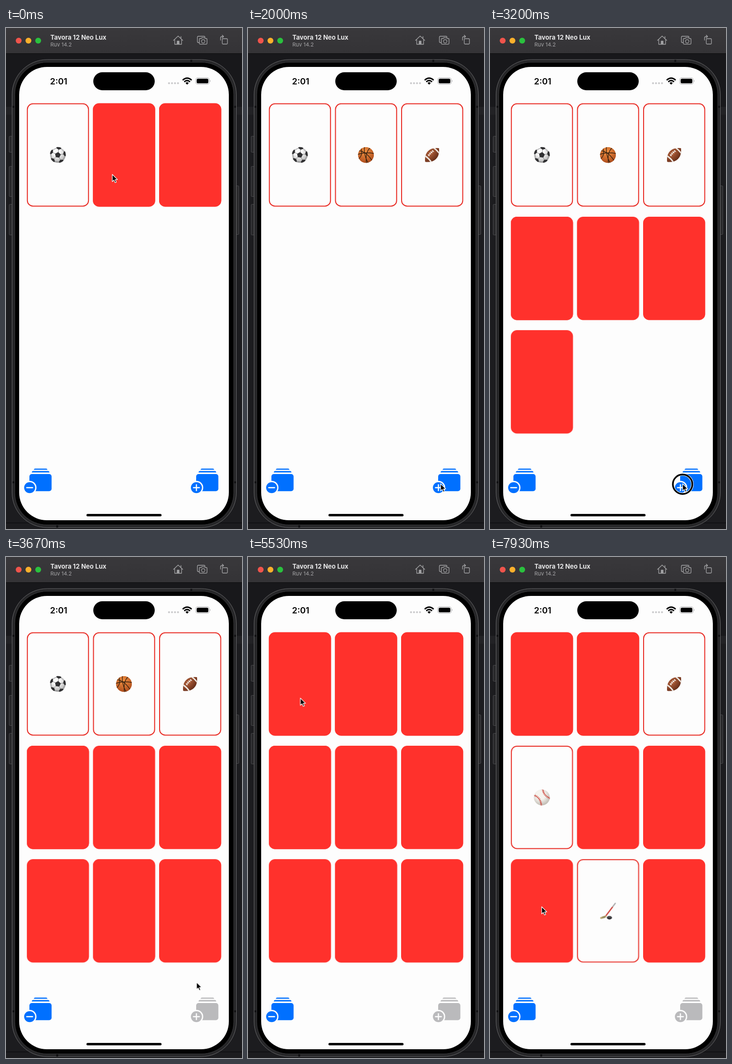
Recreate the animation shown at these times as an HTML page. Size 484 by 1030 pixels, loop 8000 ms.

```html
<!DOCTYPE html>
<html lang="en">
<head>
<meta charset="utf-8">
<title>Card matching demo</title>
<style>
html, body { margin: 0; width: 100%; height: 100%; overflow: hidden; background: #1c1c1f; }
svg { display: block; }
text { font-family: Inter, Roboto, sans-serif; }

.card, .cover, .ring { animation: 8s step-end infinite; }
.cover { fill: #ff312c; }
.face { fill: #fdfdfd; stroke: #e93029; stroke-width: 2; }
.late, .ring { opacity: 0; }

/* cards dealt by the plus button */
@keyframes deal4 { 27.5%, to { opacity: 1 } }
@keyframes deal5 { 32.25%, to { opacity: 1 } }
@keyframes deal6 { 35.4%, to { opacity: 1 } }
@keyframes deal7 { 38.1%, to { opacity: 1 } }
@keyframes deal8 { 40.9%, to { opacity: 1 } }
@keyframes deal9 { 43.3%, to { opacity: 1 } }

/* covers: 0 shows the face */
@keyframes flip1 { 0% { opacity: 0 } 66.9%, to { opacity: 1 } }
@keyframes flip2 { 5.6% { opacity: 0 } 60%, to { opacity: 1 } }
@keyframes flip3 { 14.1% { opacity: 0 } 53.4% { opacity: 1 } 85.1%, to { opacity: 0 } }
@keyframes flip4 { 74.1%, to { opacity: 0 } }
@keyframes flip8 { 93.75%, to { opacity: 0 } }

.ring { animation-name: press; }
@keyframes press {
  4.4%, 12.9%, 26.25%, 31%, 34.25%, 37%, 39.8%, 42.2%,
  52.25%, 58.75%, 65.6%, 73%, 83.6%, 92.5% { opacity: 1 }
  5.6%, 14.1%, 27.5%, 32.25%, 35.4%, 38.1%, 40.9%, 43.3%,
  53.4%, 60%, 66.9%, 74.1%, 85.1%, 93.75%, to { opacity: 0 }
}

.pointer { animation: travel 8s ease-in-out infinite; }
@keyframes travel {
  0% { transform: translate(218px, 301px) }
  3.75%, 7.5% { transform: translate(226px, 300px) }
  11.88%, 15% { transform: translate(357px, 297px) }
  23.75%, 44.5% { transform: translate(395px, 937px) }
  51.25%, 55% { transform: translate(346px, 211px) }
  58.13%, 60.75% { transform: translate(240px, 235px) }
  64.6%, 68% { transform: translate(108px, 250px) }
  72.25%, 76% { transform: translate(104px, 520px) }
  82%, 86.25% { transform: translate(365px, 267px) }
  91.5%, 94.5% { transform: translate(243px, 716px) }
  98.1%, to { transform: translate(106px, 719px) }
}

.stack { color: #0070ff; fill: currentColor; }
.plus { animation: dim 8s linear infinite, disable 8s linear infinite; }
@keyframes dim {
  0%, 26.3%, 29.4%, 31%, 34.2%, 37.2%, 39.9%, 40.05%, 44%, to { opacity: 1 }
  27.5%, 32.25%, 35.4%, 38.1%, 40.9%, 43.3% { opacity: .7 }
  42.2% { opacity: .92 }
}
@keyframes disable {
  0%, 43.3% { color: #0070ff }
  44.3%, to { color: #bababc }
}
</style>
</head>
<body>
<svg width="484" height="1030" viewBox="0 0 484 1030">
  <defs>
    <radialGradient id="white" cx=".42" cy=".3" r=".75">
      <stop offset=".3" stop-color="#fafafa"/><stop offset="1" stop-color="#a5a5a5"/>
    </radialGradient>
    <radialGradient id="cream" cx=".42" cy=".35" r=".7">
      <stop offset=".4" stop-color="#f6f4ef"/><stop offset="1" stop-color="#b9b5ac"/>
    </radialGradient>
    <radialGradient id="orange" cx=".45" cy=".3" r=".75">
      <stop offset=".1" stop-color="#ec8b3e"/><stop offset="1" stop-color="#a9481a"/>
    </radialGradient>
    <radialGradient id="brown" cx=".5" cy=".3" r=".75">
      <stop offset=".1" stop-color="#a95a36"/><stop offset="1" stop-color="#5c2714"/>
    </radialGradient>
    <clipPath id="round"><circle r="16.4"/></clipPath>
    <clipPath id="oval"><path d="M-20 0Q-11-11.5 0-11.5T20 0Q11 11.5 0 11.5T-20 0Z"/></clipPath>

    <g id="patch">
      <path d="M0-11 5-13.5 4.5-18H-4.5L-5-13.5Z" fill="#303032"/>
      <path d="M0-6V-11M5-13.5 11.3-8.9" stroke="#77777a" stroke-width=".8" fill="none"/>
    </g>
    <g id="soccer" clip-path="url(#round)">
      <circle r="16.4" fill="url(#white)"/>
      <g transform="rotate(8)">
        <path d="M0-6.2 5.9-1.9 3.6 5H-3.6L-5.9-1.9Z" fill="#303032"/>
        <use href="#patch"/>
        <use href="#patch" transform="rotate(72)"/>
        <use href="#patch" transform="rotate(144)"/>
        <use href="#patch" transform="rotate(216)"/>
        <use href="#patch" transform="rotate(288)"/>
      </g>
    </g>
    <g id="basketball" clip-path="url(#round)">
      <circle r="16.4" fill="url(#orange)"/>
      <path d="M-17-1Q-2-7 17-3M-3-17Q-5 0 5 17M-14-9Q1-7 13 12M9-15Q-2-6 1 17M-15 8Q-6 1-10-14"
        fill="none" stroke="#35200f" stroke-width="1.3"/>
    </g>
    <g id="football" transform="rotate(-45)">
      <g clip-path="url(#oval)">
        <path d="M-20-12H20V12H-20Z" fill="url(#brown)"/>
        <path d="M-12-12Q-9 0-12 12M12-12Q15 0 12 12" fill="none" stroke="#eee8e2" stroke-width="2.8"/>
      </g>
      <path d="M-7-4Q0-6 8-4M-5-7V-2M-1-7.5V-2.5M3-7.5V-2.5M7-7V-2" fill="none" stroke="#f3eee9" stroke-width="1.4"/>
    </g>
    <g id="baseball" clip-path="url(#round)">
      <circle r="16.4" fill="url(#cream)"/>
      <g fill="none" stroke="#c8372d">
        <path id="seamA" d="M2-17Q3-4 17 2M-17-5Q-2 0-1 17" stroke-width=".9"/>
        <path d="M2-17Q3-4 17 2M-17-5Q-2 0-1 17" stroke-width="4" stroke-dasharray="1.1 1.9"/>
      </g>
    </g>
    <g id="hockey" fill="none" stroke-linecap="round">
      <path d="M15-15.5-4.5 10.5" stroke="#a9a9aa" stroke-width="2.4"/>
      <path d="M9-7.5-4 9.8" stroke="#d5362d" stroke-width="2.2"/>
      <path d="M-5 11.5-14 14.5" stroke="#b5a46c" stroke-width="4"/>
      <path d="M-10 11.5V15M-7 11V14.5" stroke="#4d4a3c" stroke-width=".8"/>
      <ellipse cx="3" cy="14" rx="5.2" ry="3.6" fill="#29292c"/>
      <ellipse cx="3" cy="12.8" rx="4.4" ry="1.9" fill="#4a4a4d"/>
    </g>

    <rect id="face" class="face" x="1" y="1" width="125.4" height="210.4" rx="11.5"/>
    <rect id="back" width="127.4" height="212.4" rx="12.5"/>

    <g id="stack">
      <path d="M59.500 905.700H82.500Q84.500 905.700 85 908.300H57Q57.500 905.700 59.500 905.700Z"/>
      <path d="M55.500 910.800H86.500Q88.700 910.800 89.200 913.800H52.800Q53.300 910.800 55.500 910.800Z"/>
      <rect x="48" y="917" width="45.500" height="35.300" rx="5"/>
      <circle cx="48.500" cy="945" r="14" fill="#fdfdfd"/>
      <circle cx="48.500" cy="945" r="11.300"/>
      <path d="M42.500 945H54.500" stroke="#fdfdfd" stroke-width="2.400" stroke-linecap="round"/>
    </g>
    <linearGradient id="bar" x2="0" y2="1">
      <stop stop-color="#39383b"/><stop offset="1" stop-color="#343336"/>
    </linearGradient>
  </defs>

  <!-- desktop and window bar -->
  <rect width="484" height="1030" fill="#1c1c1f"/>
  <rect y="52" width="484" height="110" fill="#18181b"/>
  <rect y="162" width="484" height="16" fill="#222225"/>
  <path d="M0 1017.500H484" stroke="#08080a"/>
  <rect width="484" height="52" fill="url(#bar)"/>
  <path d="M0 52.500H484" stroke="#0b0b0c"/>
  <circle cx="26" cy="26" r="6" fill="#f0544c"/>
  <circle cx="46" cy="26" r="6" fill="#fbb02c"/>
  <circle cx="66" cy="26" r="6" fill="#2ac13e"/>
  <text x="91" y="24" font-size="13" font-weight="700" fill="#e6e6e7">Tavora 12 Neo Lux</text>
  <text x="91" y="38" font-size="11" fill="#a5a5a7">Ruv 14.2</text>

  <g fill="none" stroke="#a3a3a5" stroke-width="1.300" stroke-linecap="round" stroke-linejoin="round">
    <path d="M343.500 25.500 353 16.500 362.500 25.500M346 24V33.500H360V24M358.800 21.500V17.500"/>
    <path d="M351 33V27H355V33Z" fill="#a3a3a5"/>
    <path d="M395.500 30H394.500Q392.500 30 392.500 28V19Q392.500 17 394.500 17H406Q408 17 408 19"/>
    <path d="M398 21.500H400.500L402 19.800H407L408.500 21.500H410.500Q412.300 21.500 412.300 23.300V31.500Q412.300 33.300 410.500 33.300H398.300Q396.500 33.300 396.500 31.500V23.300Q396.500 21.500 398 21.500Z"/>
    <circle cx="404.400" cy="27.300" r="3.500"/>
    <rect x="443.500" y="22" width="10.700" height="11" rx="1.500"/>
    <path d="M440 25V20.500Q440 17.500 443 17.500H446M443.500 14.800 446.300 17.500 443.500 20.200"/>
  </g>

  <!-- phone -->
  <g fill="#29292b" stroke="#47474a">
    <rect x="6.500" y="222.500" width="8" height="33" rx="1.500"/>
    <rect x="6.500" y="284.500" width="8" height="62" rx="1.500"/>
    <rect x="6.500" y="362.500" width="8" height="63" rx="1.500"/>
    <rect x="470" y="324.500" width="7.500" height="100" rx="1.500"/>
  </g>
  <rect x="12.500" y="65" width="460" height="962" rx="72" fill="#262628" stroke="#666668"/>
  <path d="M380 65.500V70M105 1022V1027M13 162H17M468 162H472M13 934H17M468 934H472" stroke="#111113" stroke-width="4"/>
  <rect x="18" y="70.500" width="449" height="951" rx="66" stroke="#38383a"/>
  <rect x="27" y="80" width="430" height="932" rx="57" fill="#fdfdfd"/>
  <rect x="179" y="91" width="126" height="37" rx="18.500"/>
  <rect x="165" y="999" width="154" height="5" rx="2.500"/>
  <text x="108" y="115.700" font-size="17.500" font-weight="600" text-anchor="middle">2:01</text>
  <path d="M334.300 113.500H353" stroke="#c9c9cb" stroke-width="4" stroke-linecap="round" stroke-dasharray="0 6.150"/>
  <g fill="none" stroke="#000" stroke-width="2.700">
    <path d="M362.300 107.200Q371.500 98.800 380.700 107.200M365.500 110.700Q371.500 105.300 377.500 110.700"/>
    <path d="M371.500 116.500 368.200 113Q371.500 110.200 374.800 113Z" fill="#000" stroke="none"/>
  </g>
  <rect x="389" y="102.300" width="28" height="13.400" rx="4.300" fill="none" stroke="#a6a6a8"/>
  <rect x="391" y="104.200" width="24" height="9.600" rx="2.800"/>
  <path d="M418.300 106.800Q420.300 109 418.300 111.200Z" fill="#a6a6a8"/>

  <g id="cards"></g>

  <use href="#stack" class="stack"/>
  <g class="stack plus" >
    <use href="#stack" x="342"/>
    <path d="M390.500 939V951" stroke="#fdfdfd" stroke-width="2.400" stroke-linecap="round"/>
  </g>

  <g class="pointer">
    <g class="ring" fill="none">
      <circle cy="1" r="20" stroke="#fff" stroke-width="5.200"/>
      <circle cy="1" r="20" stroke="#000" stroke-width="3.400"/>
    </g>
    <path d="M0 0V14.800L3.400 11.700 5.700 17 8.300 15.900 6 10.700H10.600Z" stroke="#fff" stroke-width="1.200" stroke-linejoin="round"/>
  </g>
</svg>
<script>
const balls = ["soccer", "basketball", "football", "baseball", "", "", "", "hockey", ""];

document.getElementById("cards").innerHTML = balls.map((ball, i) => {
  const n = i + 1;
  const x = 42.8 + (i % 3) * 135.6;
  const y = 154.8 + Math.floor(i / 3) * 233.2;
  const dealt = n > 3 ? `class="card late" style="animation-name:deal${n}"` : "";
  const flip = ball ? `style="animation-name:flip${n}"` : "";
  const front = ball ? `<use href="#face"/><use href="#${ball}" x="63.5" y="106.3"/>` : "";
  return `<g transform="translate(${x} ${y})"><g ${dealt}>${front}<use href="#back" class="cover" ${flip}/></g></g>`;
}).join("");
</script>
</body>
</html>
```
